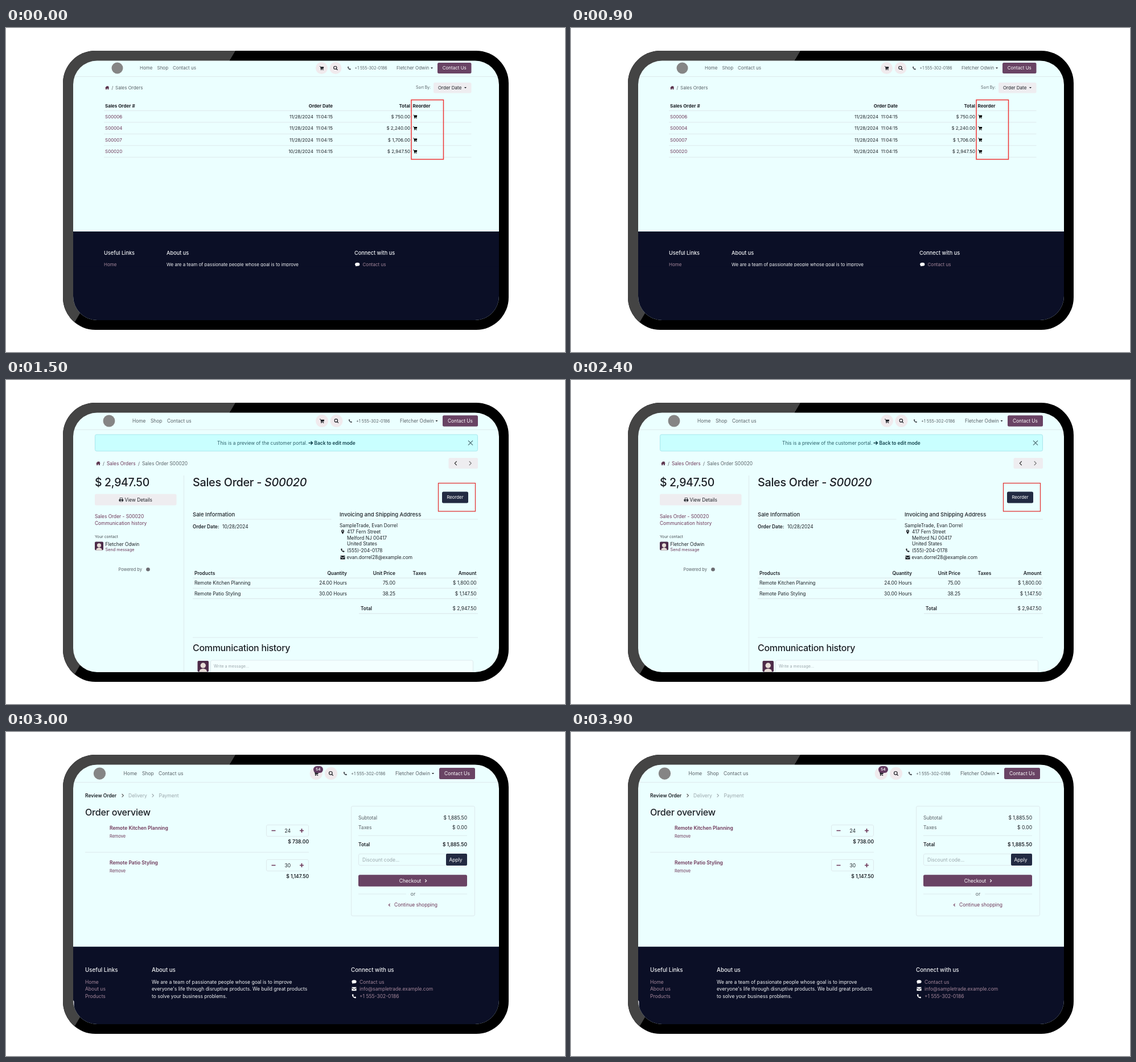
An HTML page that plays this animation: 982 px wide and 570 px high, repeating every 4500 ms.

```html
<!DOCTYPE html>
<html lang="en">
<head>
<meta charset="utf-8">
<title>Reorder from the portal</title>
<style>
  html, body { margin: 0; width: 100%; height: 100%; overflow: hidden; background: #fff; }
  svg { display: block; width: 982px; height: 570px; }
  text { font-family: Inter, "Open Sans", sans-serif; font-optical-sizing: none; white-space: pre; }
  .scene { visibility: hidden; animation: show 4500ms step-end infinite; }
  #detail { animation-delay: -3000ms; }
  #cart { animation-delay: -1500ms; }
  @keyframes show {
    0% { visibility: visible; }
    33.333%, 100% { visibility: hidden; }
  }
</style>
</head>
<body>
<svg viewBox="0 0 982 570">
  <defs>
    <clipPath id="body"><rect x="100" y="40" width="783" height="491" rx="57"/></clipPath>
    <clipPath id="screen"><rect x="118" y="57.500" width="748" height="456.500" rx="42"/></clipPath>
    <symbol id="i-cart" viewBox="0 0 16 16">
      <path d="M0 1.500h3.500l.6 2H16l-1.300 6.500-8.700 1 .3 1H14v1.500H5L3 3H0z"/>
      <circle cx="6" cy="14.300" r="1.500"/><circle cx="13" cy="14.300" r="1.500"/>
    </symbol>
    <symbol id="i-search" viewBox="0 0 16 16">
      <path d="M10.500 10.500 15 15M12 6.700a5.300 5.300 0 1 1-10.600 0 5.300 5.300 0 0 1 10.600 0z" fill="none" stroke="currentColor" stroke-width="2.300"/>
    </symbol>
    <symbol id="i-phone" viewBox="0 0 16 16"><path d="M4 1 1 3c0 6 6 12 12 12l2-3-4-3-2 2C7.500 10 6 8.500 5 7l2-2z"/></symbol>
    <symbol id="i-home" viewBox="0 0 16 16"><path d="M8 1 0 8.500h2.300V15h4.200v-4.500h3V15h4.200V8.500H16l-2.500-2.400V2h-2v2.200z"/></symbol>
    <symbol id="i-chat" viewBox="0 0 16 16"><ellipse cx="8" cy="7.500" rx="8" ry="5.500"/><path d="M3 10 2 15l5-3z"/></symbol>
    <symbol id="i-mail" viewBox="0 0 16 16"><path d="M0 2h16v1.500L8 9 0 3.500zM0 5.300 8 11l8-5.700V14H0z"/></symbol>
    <symbol id="i-pin" viewBox="0 0 16 16"><path fill-rule="evenodd" d="M8 0a5 5 0 0 1 5 5c0 4-5 11-5 11S3 9 3 5a5 5 0 0 1 5-5zm0 3a2 2 0 1 0 0 4 2 2 0 0 0 0-4z"/></symbol>
    <symbol id="i-print" viewBox="0 0 16 16"><path fill-rule="evenodd" d="M3 1h10v5h2l1 1v6h-3v2H3v-2H0V7l1-1h2zm1.500 1.500V7h7V2.500zm0 8v3h7v-3z"/></symbol>
  </defs>
  <g clip-path="url(#body)">
    <rect x="100" y="40" width="783" height="491"/>
    <path d="M100 40H403L121 517 100 552z" fill="#444"/>
  </g>
  <rect x="118" y="57.500" width="748" height="456.500" rx="42" fill="#ebffff"/>
  <g clip-path="url(#screen)">
    <g class="scene" id="list"></g>
    <g class="scene" id="detail"></g>
    <g class="scene" id="cart"></g>
  </g>
</svg>
<script>
const INK = '#1d2026', GREY = '#596066', PLUM = '#6d3557', BTN = '#694364', NAVY = '#222a42',
      PALE = '#eeedf0', RULE = '#dde9ec', NIGHT = '#0b0f26', MAUVE = '#a5879b', FADED = '#9ba6ab';
const USER = 'Fletcher Odwin', PHONE = '+1 555-302-0186';
const ITEMS = ['Remote Kitchen Planning', 'Remote Patio Styling'];

// y is the middle of the capitals
const text = (x, y, s, size, fill = INK, weight = 400, anchor = 'start', extra = '') =>
  `<text x="${x}" y="${y + size * 0.364}" font-size="${size}" fill="${fill}" font-weight="${weight}" text-anchor="${anchor}" ${extra}>${s}</text>`;
const right = (x, y, s, size, fill, weight) => text(x, y, s, size, fill, weight, 'end');
const mid = (x, y, s, size, fill, weight) => text(x, y, s, size, fill, weight, 'middle');
const title = (x, y, s, size) => text(x, y, s, size, INK, 500, 'start', 'letter-spacing="-.015em"');
const box = (x, y, x2, y2, fill, r = 0, stroke = 'none', sw = 1) =>
  `<rect x="${x}" y="${y}" width="${x2 - x}" height="${y2 - y}" rx="${r}" fill="${fill}" stroke="${stroke}" stroke-width="${sw}"/>`;
const frame = (x, y, x2, y2) => box(x, y, x2, y2, 'none', 2.5, RULE);
const line = (x, x2, y, color = RULE, w = 1) => `<path d="M${x} ${y}H${x2}" stroke="${color}" stroke-width="${w}"/>`;
const stroke = (d, color, w = 1.1) => `<path d="${d}" fill="none" stroke="${color}" stroke-width="${w}"/>`;
const disc = (x, y, r, fill) => `<circle cx="${x}" cy="${y}" r="${r}" fill="${fill}"/>`;
const icon = (name, x, y, size, color = INK) =>
  `<use href="#i-${name}" x="${x - size / 2}" y="${y - size / 2}" width="${size}" height="${size}" fill="${color}" color="${color}"/>`;
const chevron = (x, y, dir, color, h = 2.8) =>
  stroke(`M${x - dir * h / 2} ${y - h}l${dir * h} ${h}l${-dir * h} ${h}`, color);
const caret = (x, y) => `<path d="M${x - 2} ${y - 1}h4l-2 2.200z" fill="${INK}"/>`;
const avatar = (x, y, s) => box(x, y, x + s, y + s, '#4d2c49', 2) +
  disc(x + s / 2, y + s * .42, s * .24, '#e6dcd6') +
  `<path d="M${x + s * .15} ${y + s}a${s * .35} ${s * .3} 0 0 1 ${s * .7} 0z" fill="#e6dcd6"/>`;

function header({ y, size, logo, nav, cart, search, phone, user, button, rule }) {
  const [b1, b2] = button, r = size * 1.31, half = size * 1.18;
  return line(118, 866, rule) +
    disc(logo, y, size * 1.25, '#858585') +
    ['Home', 'Shop', 'Contact us'].map((s, i) => text(nav[i], y, s, size, GREY)).join('') +
    disc(cart, y, r, '#f0eaed') + icon('cart', cart, y, size) +
    disc(search, y, r, '#f0eaed') + icon('search', search, y, size) +
    icon('phone', phone[0], y, size * .85, '#444a50') + text(phone[1], y, PHONE, size * .875, GREY) +
    text(user[0], y, USER, size, GREY) + caret(user[1], y) +
    box(b1, y - half, b2, y + half, BTN, 2.5) + mid((b1 + b2) / 2, y, 'Contact Us', size, '#fff');
}

function footer(top, y, size, cols) {
  return box(117, top, 867, 516, NIGHT) +
    ['Useful Links', 'About us', 'Connect with us']
      .map((s, i) => text(cols[i], y, s, size * 1.15, '#f2f4f6', 500)).join('');
}

const ABOUT = ['We are a team of passionate people whose goal is to improve',
  "everyone's life through disruptive products. We build great products",
  'to solve your business problems.'];

function list() {
  const k = 8;
  const rows = [['S00006', '11', '750.00'], ['S00004', '11', '2,240.00'],
                ['S00007', '11', '1,706.00'], ['S00020', '10', '2,947.50']];
  return header({ y: 70.5, size: k, logo: 195.5, nav: [235, 265.5, 293], cart: 554.5, search: 579,
      phone: [603, 612.5], user: [686, 748], button: [758, 817.5], rule: 85.5 }) +
    icon('home', 177.7, 105, 7.5, '#59304a') + text(185.5, 105, '/', k, GREY) + text(192, 105, 'Sales Orders', k, GREY) +
    text(720, 104.5, 'Sort By:', 7, GREY) +
    box(751, 96, 817.5, 114.5, PALE, 2.5) + text(759, 105, 'Order Date', k) + caret(807, 105) +
    text(174, 137, 'Sales Order #', k, INK, 700) + right(574, 137, 'Order Date', k, INK, 700) +
    right(710, 137, 'Total', k, INK, 700) + text(714.5, 137, 'Reorder', k, INK, 700) +
    line(172, 817.5, 145.5) +
    rows.map(([id, month, sum], i) => {
      const y = 155.7 + i * 20.45;
      return text(174, y, id, k, PLUM) + right(540, y, month + '/28/2024', k) + right(574, y, '11:04:15', k) +
        right(710, y, '$ ' + sum, k) + icon('cart', 718.7, y, 7.5, '#000') + line(172, 817.5, y + 10.2);
    }).join('') +
    box(712, 126.5, 768.5, 231, 'none', 0, '#ee3434', 1.5) +
    footer(358, 396, k, [172, 282, 612]) +
    text(172, 416, 'Home', k, MAUVE) + text(282, 416, ABOUT[0], k, '#f2f4f6') +
    icon('chat', 617.3, 416, 8.5, '#fff') + text(626.5, 416, 'Contact us', k, MAUVE) +
    box(118, 419.5, 866, 430, NIGHT);
}

function detail() {
  const k = 8.35;
  const rows = [[ITEMS[0], '24.00', '75.00', '1,800.00'], [ITEMS[1], '30.00', '38.25', '1,147.50']];
  const address = ['417 Fern Street', 'Melford NJ 00417', 'United States'];
  return header({ y: 72, size: k, logo: 181, nav: [222, 254, 283], cart: 555, search: 580.5,
      phone: [605, 615], user: [692, 756.5], button: [767, 829], rule: 87.5 }) +
    box(156.5, 96, 828.5, 125, '#c9ffff', 2.5, '#a8e6ec') +
    text(371, 110.7, 'This is a preview of the customer portal.', k, '#2c5f68') +
    stroke('M531.500 110.700h7M535.500 107.700l3 3-3 3', '#12434d', 1.5) +
    text(541.5, 110.7, 'Back to edit mode', k, '#12434d', 600) +
    stroke('M812 106.700l8 8m0-8l-8 8', '#4b6a70', 1.2) +
    icon('home', 162, 146.5, 8, '#59304a') + text(170, 146.5, '/', k, GREY) +
    text(177, 146.5, 'Sales Orders', k, PLUM) + text(232, 146.5, '/', k, GREY) +
    text(239, 146.5, 'Sales Order S00020', k, GREY) +
    box(777.5, 137, 829, 156, PALE, 2.5) + chevron(790, 146.5, -1, '#333', 3.5) + chevron(815.5, 146.5, 1, '#777', 3.5) +
    title(156, 180, '$ 2,947.50', 19.4) +
    box(156, 200.5, 299.5, 220.5, PALE, 2.5) + icon('print', 202.3, 210.7, 8) + text(208.5, 210.7, 'View Details', k) +
    text(156, 239.5, 'Sales Order - S00020', k, PLUM) + text(156, 252, 'Communication history', k, PLUM) +
    text(156, 275.5, 'Your contact', 6.8, '#444a50') + avatar(156, 284.5, 15) +
    text(174.5, 289, USER, k) + text(174.5, 298.7, 'Send message', 7.3, PLUM) +
    text(197.5, 333, 'Powered by', 7.4, GREY) + disc(249.5, 333.3, 3.3, '#6c6c72') +
    stroke('M312.500 168V514', RULE, 1) +
    title(328, 180, 'Sales Order - <tspan font-style="italic">S00020</tspan>', 19.8) +
    box(759.5, 181.5, 824.5, 231, 'none', 0, '#e23434', 1.3) +
    box(766, 196.5, 812, 216.5, NAVY, 2.5) + mid(789, 206.5, 'Reorder', 7.8, '#fff') +
    text(328, 236.5, 'Sale Information', 9.5, INK, 500) + line(328, 571.5, 245) +
    text(586, 236.5, 'Invoicing and Shipping Address', 9.5, INK, 500) + line(586, 829, 245) +
    text(328, 258.3, 'Order Date:', k, INK, 600) + text(380, 258.3, '10/28/2024', k) +
    text(586, 256, 'SampleTrade, Evan Dorrel', k) +
    icon('pin', 591.5, 267.3, 8) + address.map((s, i) => text(599, 267.3 + i * 10.4, s, k)).join('') +
    icon('phone', 591.5, 299.5, 7.5) + text(599, 299.5, '(555)-204-0178', k) +
    icon('mail', 591.5, 312.2, 8.5) + text(598.5, 312.2, 'evan.dorrel28@example.com', k) +
    text(331, 339.5, 'Products', k, INK, 600) + right(599, 339.5, 'Quantity', k, INK, 600) +
    right(684, 339.5, 'Unit Price', k, INK, 600) + mid(726.5, 339.5, 'Taxes', k, INK, 600) +
    right(826.5, 339.5, 'Amount', k, INK, 600) + line(328, 829, 348.3, RULE, 1.3) +
    rows.map(([name, hours, price, sum], i) => {
      const y = 357.3 + i * 18.3;
      return text(331, y, name, k) + right(599, y, hours + ' Hours', k) + right(684, y, price, k) +
        right(826.5, y, '$ ' + sum, k) + line(328, 829, y + 9, RULE, 1.3);
    }).join('') +
    text(623, 402, 'Total', k, INK, 600) + right(826.5, 402, '$ 2,947.50', k) + line(620, 829, 410.8, RULE, 1.3) +
    line(328, 829, 453) + title(328, 471, 'Communication history', 15.9) +
    avatar(336.5, 494, 19.5) + box(359.5, 493, 820.5, 530, '#f3ffff', 3, RULE) +
    text(365, 503.8, 'Write a message...', 7.1, FADED);
}

function cart() {
  const k = 8.5;
  const sums = [['24', '738.00'], ['30', '1,147.50']];
  const lines = [439.5, 452, 464.7];
  return header({ y: 73, size: k, logo: 164.5, nav: [206.5, 239, 268], cart: 544.8, search: 571,
      phone: [596, 606], user: [684, 750], button: [761, 824], rule: 88.5 }) +
    box(540, 60, 557, 72, '#623a60', 6) + mid(548.5, 66, '54', 6.5, '#fff', 600) +
    text(139, 111.8, 'Review Order', k, INK, 600) + chevron(205, 111.8, 1, '#555') +
    text(215, 111.8, 'Delivery', k, FADED) + chevron(258, 111.8, 1, FADED) + text(268.5, 111.8, 'Payment', k, FADED) +
    title(139, 140.8, 'Order overview', 16.1) +
    sums.map(([count, sum], i) => {
      const y = 168.5 + i * 61;
      return text(182, y, ITEMS[i], k, PLUM, 600) + text(182, y + 15, 'Remove', 7.4, PLUM) +
        frame(457.5, y - 5, 531.5, y + 15) + stroke(`M466.500 ${y + 5}h7M516 ${y + 5}h7m-3.500-3.500v7`, PLUM, 1.7) +
        mid(494.7, y + 5, count, k) + right(532, y + 24.5, '$ ' + sum, k, INK, 600);
    }).join('') +
    line(139, 532, 211.5) +
    frame(606.5, 130.5, 823.5, 323.5) +
    text(619, 150.5, 'Subtotal', k, GREY) + right(810, 150.5, '$ 1,885.50', k) +
    text(619, 167.5, 'Taxes', k, GREY) + right(810, 167.5, '$ 0.00', k) + line(619, 810, 182.3) +
    text(619, 197.8, 'Total', k, INK, 600) + right(810, 197.8, '$ 1,885.50', k, INK, 600) +
    frame(619.5, 214.5, 775, 234.5) + text(626, 224.7, 'Discount code...', k, FADED) +
    box(773, 214, 810, 235, NAVY, 2) + mid(790, 224.7, 'Apply', k, '#fff') +
    box(619, 251.3, 810, 271.8, BTN, 2.5) + mid(710, 261.7, 'Checkout', k, '#fff') + chevron(737.5, 261.7, 1, '#fff', 2.3) +
    line(619, 703, 285) + mid(715, 285.3, 'or', k, GREY) + line(727, 810, 285) +
    chevron(673.5, 304.3, -1, PLUM, 2.2) + text(682, 304.3, 'Continue shopping', k, PLUM) +
    footer(377.7, 418, k, [139, 256, 606]) +
    ['Home', 'About us', 'Products'].map((s, i) => text(139, lines[i], s, k, MAUVE)).join('') +
    ABOUT.map((s, i) => text(256, lines[i], s, k, '#f2f4f6')).join('') +
    [['chat', 'Contact us'], ['mail', 'info@sampletrade.example.com'], ['phone', PHONE]]
      .map(([name, s], i) => icon(name, 611.5, lines[i], 8.5, '#fff') + text(621, lines[i], s, k, MAUVE)).join('') +
    '<path d="M118 472l1.500 2v11l-1.500-2z" fill="#fff"/>';
}

for (const scene of [list, detail, cart]) document.getElementById(scene.name).innerHTML = scene();
</script>
</body>
</html>
```
